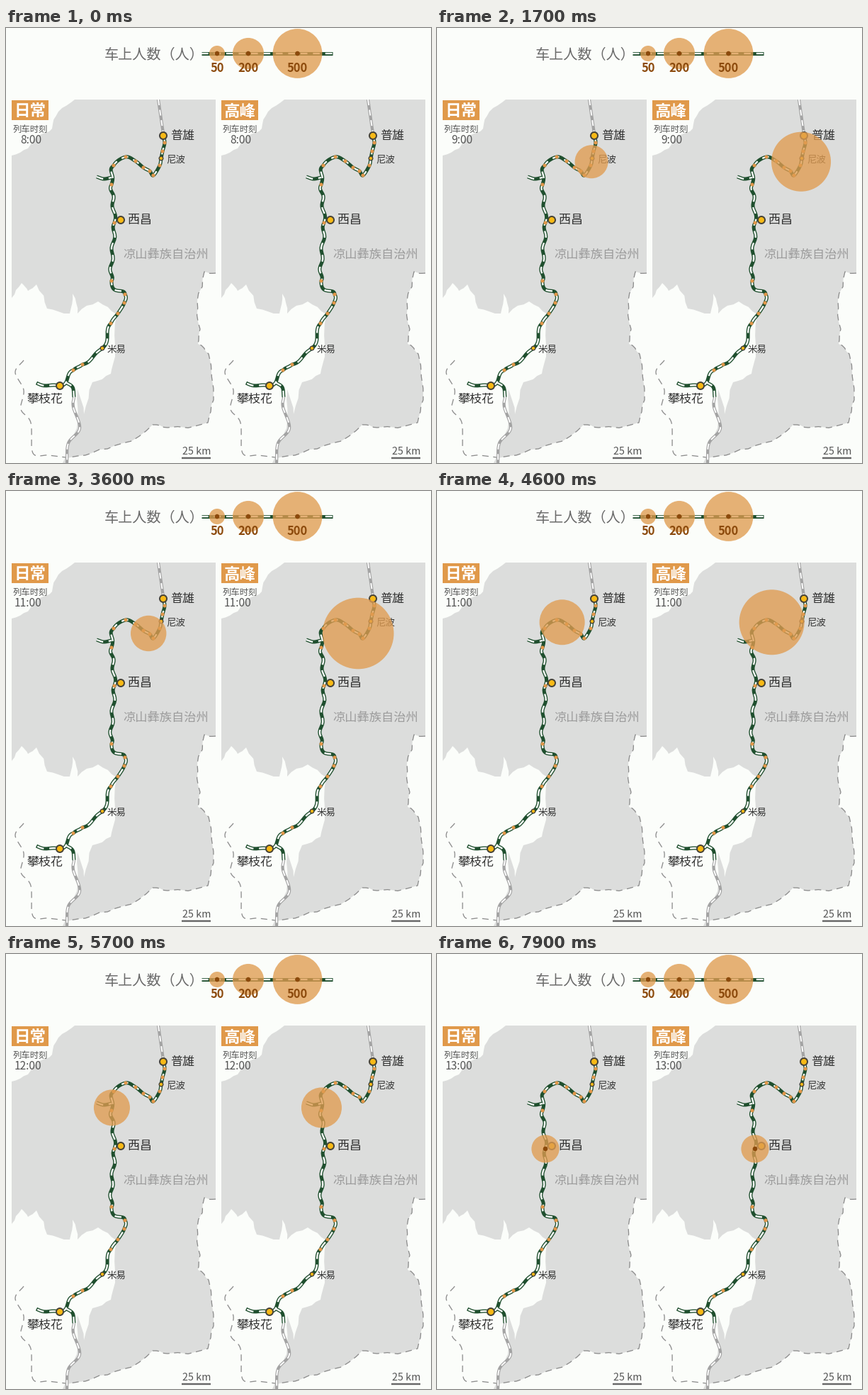
Recreate the animation shown at these times as a matplotlib script. Size 600 px wide and 614 px high, loop 8 s.

```python
import numpy as np
import matplotlib.pyplot as plt
from matplotlib.animation import FuncAnimation
from matplotlib.patches import Circle, Polygon, Rectangle

W, H, DPI = 600, 614, 100
PX = 72 / DPI
STEP, FRAMES = 100, 80
HOUR = 1440  # ms of animation per hour of timetable
SHIFT = 296  # distance between the two maps

PAPER, LAND, GREEN = "#fbfdfa", "#dcdddc", "#1f4f2e"
ORANGE, BROWN, YELLOW = "#e0994a", "#8c4a0c", "#f8b916"
INK, GREY = "#333333", "#9b9b9b"

plt.rcParams["font.family"] = "Noto Sans CJK JP"
fig = plt.figure(figsize=(W / DPI, H / DPI), dpi=DPI, facecolor=PAPER)
ax = fig.add_axes([0, 0, 1, 1])
ax.set_xlim(0, W)
ax.set_ylim(H, 0)
ax.axis("off")

# The line from north to south; every point but the ends is a stop.
ROUTE = [(222, 152), (224, 162), (221, 174), (219, 184), (217, 194), (208, 208),
         (203, 202), (194, 197), (183, 188), (169, 182), (152, 194), (149, 221),
         (153, 275), (149, 357), (168, 376), (167, 388), (158, 403), (148, 417),
         (136, 452), (108, 475), (95, 483), (76, 505), (43, 501)]
STOPS = np.array(ROUTE[1:-2])
SPUR = [(128, 210), (138, 213), (149, 211)]
SOUTH = [(84, 500), (94, 507), (96, 521)]
GREY_NORTH = [(215, 101), (222, 149)]
GREY_SOUTH = [(96, 521), (95, 535), (104, 565), (88, 586), (86, 614)]

NORTH_WEST = [(97, 101), (74, 118), (65, 142), (48, 151), (31, 170), (8, 180)]
BASIN = [(8, 381), (22, 360), (31, 371), (43, 362), (58, 396), (90, 403),
         (94, 375), (101, 403), (130, 386), (156, 404), (154, 464), (148, 488),
         (122, 500), (110, 545), (101, 510), (100, 565), (80, 614)]
EAST = [(296, 346), (280, 344), (270, 385), (274, 425), (271, 446), (286, 460),
        (293, 525), (285, 557), (228, 564), (207, 560), (165, 586), (121, 600),
        (84, 608)]
WEST = [(25, 469), (13, 486), (25, 511), (21, 538), (35, 557), (38, 600),
        (60, 603), (84, 606)]
TOWNS = [("普雄", 222, 152, True, 232, 150), ("尼波", 219, 184, False, 226, 184),
         ("西昌", 162, 271, True, 172, 269), ("米易", 136, 452, False, 143, 452),
         ("攀枝花", 76, 505, True, 29, 522)]

# Times at the first points of the route, and circle sizes over time.
ARRIVE = [900, 1050, 1150, 1250, 2200, 2480, 3500, 4000, 4350, 4900, 5250,
          5780, 7400]
SIZE_T = [900, 1200, 1700, 2400, 3600, 4600, 5700, 7400]
SIZES = ([0, 20, 23.5, 25, 25.2, 32, 25.5, 19.6],
         [0, 36, 42, 45.7, 50.3, 46, 28.5, 19.6])


def smooth(pts, wave=0, n=24):
    """Catmull-Rom curve; long legs swing sideways by `wave` pixels."""
    p = np.array(pts, float)
    p = np.vstack([2 * p[0] - p[1], p, 2 * p[-1] - p[-2]])
    u = np.linspace(0, 1, n, endpoint=False)[:, None]
    parts = []
    for a, b, c, d in zip(p, p[1:], p[2:], p[3:]):
        leg = 0.5 * (2 * b + (c - a) * u + (2 * a - 5 * b + 4 * c - d) * u**2
                     + (3 * b - a - 3 * c + d) * u**3)
        dx, dy = c - b
        size = np.hypot(dx, dy)
        swing = wave * np.sin(2 * np.pi * int(size / 26) * u)
        parts.append(leg + swing * np.array([-dy, dx]) / size)
    return np.vstack(parts + [p[-2:-1]])


def rough(pts, seed, rounds=2):
    """Halve each edge and push the midpoints aside for a ragged border."""
    rng = np.random.default_rng(seed)
    p = np.array(pts, float)
    for _ in range(rounds):
        edge = np.diff(p, axis=0)
        side = edge[:, ::-1] * [-1, 1] * rng.uniform(-0.1, 0.1, (len(edge), 1))
        out = np.empty((2 * len(p) - 1, 2))
        out[::2], out[1::2] = p, p[:-1] + edge / 2 + side
        p = out
    return p


def line(pts, color, width, z, clip=None, **kw):
    item, = ax.plot(*np.transpose(pts), color=color, lw=width * PX, zorder=z,
                    solid_capstyle="butt", dash_capstyle="butt", **kw)
    if clip is not None:
        item.set_clip_path(clip)


def rail(pts, color, z, clip=None, width=5):
    line(pts, color, width, z, clip)
    line(pts, "white", width * 0.46, z + 0.1, clip, dashes=(4.2, 3.4))


def text(x, y, s, size, color=INK, ha="left", z=6, **kw):
    return ax.text(x, y, s, fontsize=size * PX, color=color, ha=ha,
                   va="center_baseline", zorder=z, **kw)


def disc(x, y, r, color, z, edge="none", width=0, alpha=None):
    return ax.add_patch(Circle((x, y), r, fc=color, ec=edge, lw=width * PX,
                               zorder=z, alpha=alpha))


def bubble(x, y, r, z):
    return disc(x, y, r, "#e09c50", z, alpha=0.78)


def panel(dx, title):
    off = np.array([dx, 0])
    frame = ax.add_patch(Rectangle((8 + dx, 101), 288, 513, fc=LAND, ec="none"))
    east = rough(EAST, 3)
    areas = ((rough(NORTH_WEST, 1), [(8, 101)]), (rough(BASIN, 2), [(8, 614)]),
             (east, [(84, 614), (296, 614)]))
    for border, corners in areas:
        area = ax.add_patch(Polygon(np.vstack([border, corners]) + off,
                                    fc=PAPER, ec="none", zorder=2))
        area.set_clip_path(frame)
    for border in (east, smooth(WEST)):
        line(border + off, "#8c8c8c", 1.3, 3, frame, dashes=(7, 5))
    for track in (GREY_NORTH, GREY_SOUTH):
        rail(smooth(track) + off, "#a3a3a3", 3.2, frame, 4.2)
    for track in (SPUR, SOUTH, ROUTE):
        rail(smooth(track, 1.8) + off, GREEN, 4, frame)
    for x, y in STOPS + off:
        disc(x, y, 2.5, "#e2974a", 5)
    for name, x, y, big, tx, ty in TOWNS:
        disc(x + dx, y, 5 if big else 2.8, YELLOW, 5.2, "#474338", 2 if big else 1.4)
        text(tx + dx, ty, name, 17 if big else 13.5, weight="medium")
    text(165 + dx, 318.5, "凉山彝族自治州", 17.2, GREY)

    ax.add_patch(Rectangle((8 + dx, 101.5), 52, 28.5, fc=ORANGE, ec="none", zorder=5))
    text(34 + dx, 115.5, title, 22.5, "white", "center", weight="bold")
    text(10 + dx, 142.3, "列车时刻", 12.4, "#555555")
    text(249 + dx, 596, "25 km", 14.3, "#555555")
    line([(248 + dx, 606.5), (289 + dx, 606.5)], "#666666", 2.4, 6)
    clock = text(50.5 + dx, 156.8, "", 15.5, "#555555", "right")
    return clock, bubble(0, 0, 0, 8), disc(0, 0, 3.3, BROWN, 9)


def legend():
    text(139, 36, "车上人数（人）", 20.1, "#6a6a6a")
    rail([(276, 36), (461, 36)], GREEN, 4)
    for x, people in ((298, 50), (342, 200), (411.5, 500)):
        bubble(x, 36, 1.56 * people**0.5, 7)
        disc(x, 36, 3.3, BROWN, 8)
        text(x, 55.5, str(people), 16.5, BROWN, "center", 8, weight="bold")


legend()
panels = [panel(0, "日常"), panel(SHIFT, "高峰")]


def draw(i):
    t = i * STEP
    x, y = (np.interp(t, ARRIVE, axis) for axis in np.transpose(ROUTE[:len(ARRIVE)]))
    hour = 8 + (t + HOUR // 2) // HOUR
    for k, (clock, ring, dot) in enumerate(panels):
        clock.set_text(f"{hour}:00")
        ring.center = dot.center = (x + k * SHIFT, y)
        ring.set_radius(np.interp(t, SIZE_T, SIZES[k]))
        dot.set_visible(t >= ARRIVE[-1])
    return [item for p in panels for item in p]


anim = FuncAnimation(fig, draw, frames=FRAMES, interval=STEP, repeat=True,
                     repeat_delay=0, init_func=lambda: draw(0))
plt.show()
```
